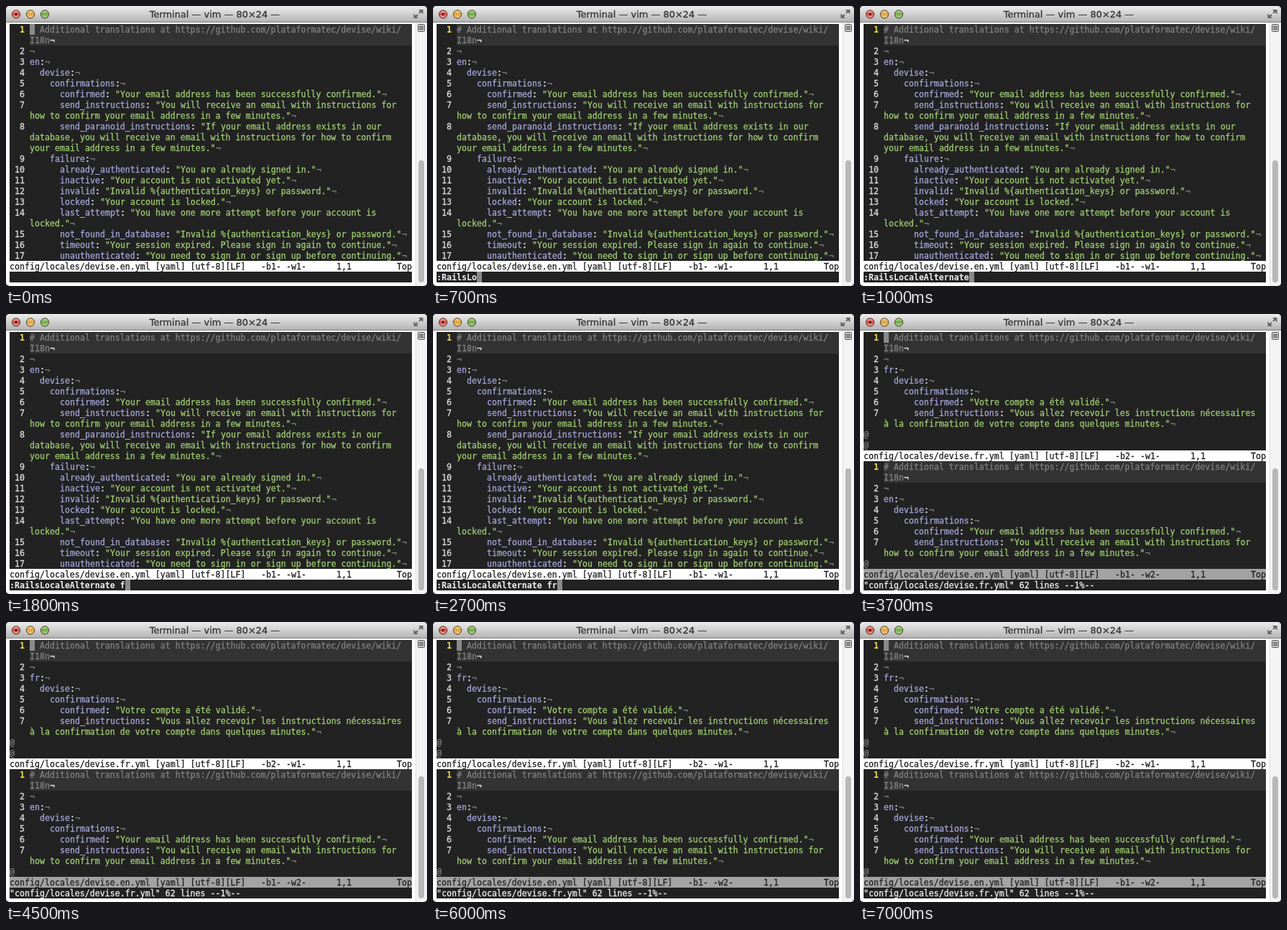
These frames come from a looping animation (586x390 px, 7.3 s). An HTML page:

```html
<!DOCTYPE html>
<html lang="en">
<head>
<meta charset="utf-8">
<title>Terminal</title>
<style>
  html, body { margin: 0; width: 100%; height: 100%; overflow: hidden; background: #222; }
  svg { display: block; width: 586px; height: 390px; border-radius: 5px; }
  text { white-space: pre; font: 11.628px "DejaVu Sans Mono", monospace; font-variant-ligatures: none; stroke-width: .3px; }
  .bold { font-weight: bold; stroke: none; }
  .title { font: 12.93px "DejaVu Sans", sans-serif; }
</style>
</head>
<body>
<svg id="stage" viewBox="0 0 586 390">
  <defs>
    <linearGradient id="bar" x2="0" y2="1">
      <stop stop-color="#ececec"/><stop offset="1" stop-color="#b4b4b4"/>
    </linearGradient>
    <linearGradient id="shine" x2="0" y2="1">
      <stop stop-color="#fff" stop-opacity=".6"/>
      <stop offset=".45" stop-color="#fff" stop-opacity="0"/>
      <stop offset="1" stop-color="#fff" stop-opacity=".5"/>
    </linearGradient>
  </defs>
  <rect width="586" height="390" fill="#fff"/>
  <rect width="586" height="22" fill="url(#bar)"/>
  <path d="M0 22.5H586" stroke="#7c7c7c"/>
  <g id="lights"></g>
  <text class="title" x="290.5" y="16" text-anchor="middle" fill="#333" stroke="#333">Terminal — vim — 80×24 —</text>
  <path d="M574 5H580.5V11.5ZM567.5 10.5V17H574Z" fill="#666"/>
  <path d="M575 10L579 6M573 12L569 16" stroke="#666" stroke-width="2"/>
  <rect x="570" y="23" width="16" height="367" fill="#f4f4f4"/>
  <path d="M570.5 23V390" stroke="#dedede"/>
  <rect x="573.5" y="25.5" width="9" height="10" rx="1" fill="#ccc" stroke="#555"/>
  <path d="M575 28.5H581M575 30.5H581M575 32.5H581" stroke="#444"/>
  <rect x="574" y="215" width="8" height="170" rx="4" fill="#b8b8b8"/>
  <rect x="5" y="25" width="560" height="360" fill="#222"/>
  <g id="single"></g>
  <g id="split"></g>
  <g id="prompt"></g>
</svg>
<script>
const LOOP = 7300, SPLIT_AT = 2800, COL = 7, ROW = 15, LEFT = 5, TOP = 25;
const COLORS = {
  comment: '#808080', key: '#a4a4d8', string: '#9fcb72', plain: '#e6e6e6',
  eol: '#808080', number: '#dcdcdc', current: '#f0e050', cursor: '#8a8a8a', line: '#333'
};

// "|" marks a soft wrap
const HEADER = ['# Additional translations at https://github.com/plataformatec/devise/wiki/|I18n', ''];
const ENGLISH = [...HEADER,
  'en:',
  '  devise:',
  '    confirmations:',
  '      confirmed: "Your email address has been successfully confirmed."',
  '      send_instructions: "You will receive an email with instructions for|how to confirm your email address in a few minutes."',
  '      send_paranoid_instructions: "If your email address exists in our|database, you will receive an email with instructions for how to confirm|your email address in a few minutes."',
  '    failure:',
  '      already_authenticated: "You are already signed in."',
  '      inactive: "Your account is not activated yet."',
  '      invalid: "Invalid %{authentication_keys} or password."',
  '      locked: "Your account is locked."',
  '      last_attempt: "You have one more attempt before your account is|locked."',
  '      not_found_in_database: "Invalid %{authentication_keys} or password."',
  '      timeout: "Your session expired. Please sign in again to continue."',
  '      unauthenticated: "You need to sign in or sign up before continuing."'
];
const FRENCH = [...HEADER,
  'fr:',
  '  devise:',
  '    confirmations:',
  '      confirmed: "Votre compte a été validé."',
  '      send_instructions: "Vous allez recevoir les instructions nécessaires|à la confirmation de votre compte dans quelques minutes."'
];

const COMMAND = ':RailsLocaleAlternate fr';
// [time in ms, typed characters]
const TYPING = [[0, 0], [100, 1], [200, 2], [300, 3], [400, 4], [500, 6], [600, 7],
  [700, 8], [800, 9], [900, 21], [1400, 22], [1700, 23], [2200, 24]];

const $ = id => document.getElementById(id);

function add(parent, tag, attrs, content = '') {
  const node = document.createElementNS('http://www.w3.org/2000/svg', tag);
  for (const name in attrs) node.setAttribute(name, attrs[name]);
  node.textContent = content;
  return parent.appendChild(node);
}

function write(parent, col, row, str, fill, bold) {
  return add(parent, 'text', {
    x: LEFT + col * COL, y: TOP + row * ROW + 12, fill, stroke: fill, class: bold ? 'bold' : ''
  }, str);
}

function block(parent, col, row, cols, rows, fill) {
  return add(parent, 'rect', {
    x: LEFT + col * COL, y: TOP + row * ROW, width: cols * COL, height: rows * ROW, fill
  });
}

function drawBuffer(parent, lines, top) {
  let row = top;
  block(parent, 4, top, 76, 2, COLORS.line);
  lines.forEach((line, i) => {
    write(parent, 0, row, String(i + 1).padStart(3), i ? COLORS.number : COLORS.current, i === 0);
    const parts = line.split('|');
    parts.forEach((part, n) => {
      const pair = part.match(/^( *)(\w+)(:)( ?)(.*)$/);
      if (i === 0) {
        write(parent, 4, row, part, COLORS.comment);
      } else if (pair && n === 0) {
        const [, indent, key, colon, gap, value] = pair;
        const start = 4 + indent.length, after = start + key.length;
        write(parent, start, row, key, COLORS.key);
        write(parent, after, row, colon, COLORS.plain);
        if (value) write(parent, after + 1 + gap.length, row, value, COLORS.string);
      } else if (part) {
        write(parent, 4, row, part, COLORS.string);
      }
      if (n === parts.length - 1) {
        write(parent, 4 + part.length, row, '¬', i ? COLORS.eol : COLORS.plain, i === 0);
      }
      row++;
    });
  });
}

function drawStatus(parent, row, lang, buffer, win, active) {
  block(parent, 0, row, 80, 1, active ? '#fff' : '#a3a3a3');
  const items = [[0, `config/locales/devise.${lang}.yml [yaml] [utf-8][LF]`],
    [50, `-b${buffer}- -w${win}-`], [65, '1,1'], [77, 'Top']];
  for (const [col, str] of items) write(parent, col, row, str, '#222');
}

function drawCursor(parent) {
  return block(parent, 4, 0, 1, 1, COLORS.cursor);
}

['#d9493f', '#e0a030', '#6aa83c'].forEach((fill, i) => {
  const spot = { cx: 14 + 20 * i, cy: 11.5, r: 5.7 };
  add($('lights'), 'circle', { ...spot, fill, stroke: '#55463c' });
  add($('lights'), 'circle', { ...spot, r: 4.8, fill: 'url(#shine)' });
});
add($('lights'), 'circle', { cx: 14, cy: 11.5, r: 1.8, fill: '#5c1410' });

const single = $('single'), split = $('split'), prompt = $('prompt');
drawBuffer(single, ENGLISH, 0);
drawStatus(single, 22, 'en', 1, 1, true);
const idleCursor = drawCursor(single);

drawBuffer(split, FRENCH, 0);
drawCursor(split);
drawStatus(split, 11, 'fr', 2, 1, true);
drawBuffer(split, ENGLISH.slice(0, 7), 12);
drawStatus(split, 22, 'en', 1, 2, false);
for (const row of [9, 10, 21]) write(split, 0, row, '@', COLORS.eol);
write(split, 0, 23, '"config/locales/devise.fr.yml" 62 lines --1%--', '#eee');

const typed = write(prompt, 0, 23, '', '#eee', true);
const caret = block(prompt, 0, 23, 1, 1, COLORS.cursor);

function show(node, visible) {
  node.style.display = visible ? '' : 'none';
}

function render() {
  const time = performance.now() % LOOP;
  const isSplit = time >= SPLIT_AT;
  const count = TYPING.findLast(([at]) => at <= time)[1];
  show(single, !isSplit);
  show(split, isSplit);
  show(prompt, !isSplit && count > 0);
  show(idleCursor, count === 0);
  typed.textContent = COMMAND.slice(0, count);
  caret.setAttribute('x', LEFT + count * COL);
  requestAnimationFrame(render);
}
render();
</script>
</body>
</html>
```
